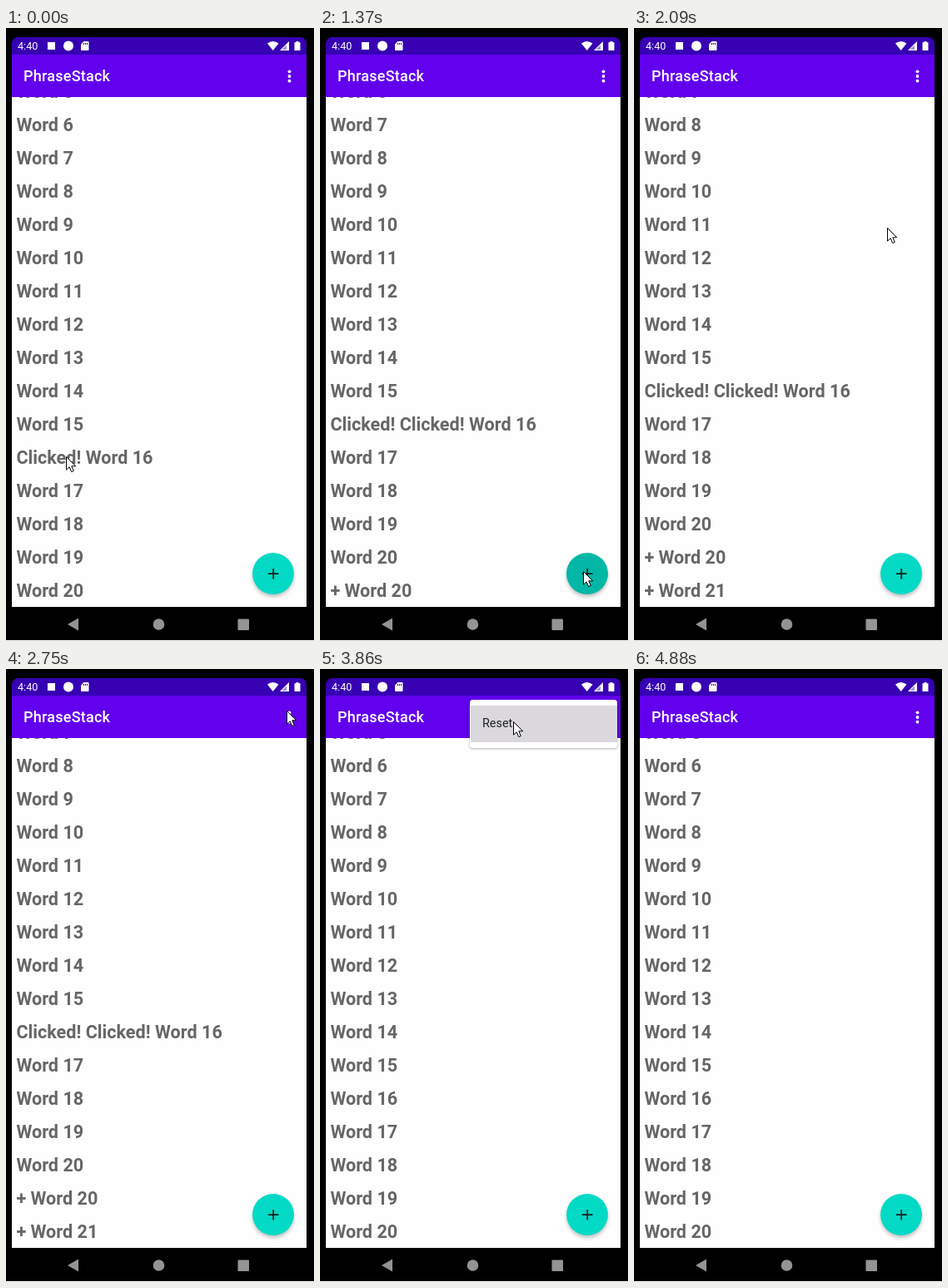
Animation, 370 px wide and 737 px high, one loop 5.03 s. Source, as an HTML page:

```html
<!DOCTYPE html>
<html lang="en">
<head>
<meta charset="utf-8">
<title>Word list</title>
<style>
  html, body { margin: 0; width: 100%; height: 100%; overflow: hidden; background: #000; }
  body { position: relative; font-family: Roboto, sans-serif; }
  body *, .icons { position: absolute; }
  .icons { left: 0; top: 0; }
  .edge { left: 0; top: 736px; width: 370px; height: 1px; background: #fff; }

  .status { left: 7px; top: 11px; width: 354px; height: 22px; background: #3700b3; border-radius: 8px 8px 0 0; }
  .clock { left: 7px; top: 0; font-size: 12.6px; line-height: 22px; color: #fff; }
  .bar { left: 7px; top: 32px; width: 354px; height: 50.5px; background: #6200ee; }
  .title { left: 14px; top: 1px; font: 500 18px/50px Roboto, sans-serif; letter-spacing: .0125em; color: #fff; }

  .list { left: 7px; top: 82px; width: 354px; height: 613.5px; overflow: hidden; background: #fefefe; }
  .rows { left: 5.4px; top: -25.5px; }
  .rows div { position: static; height: 40px; font: bold 21.6px/40px Roboto, sans-serif; color: #666; white-space: pre; }
  .rows span { position: static; }

  .fab { left: 295.8px; top: 630.8px; width: 50.4px; height: 50.4px; border-radius: 50%; overflow: hidden;
         background: #03dac5; box-shadow: 0 3px 4px rgba(0, 0, 0, .24); }
  .wave { left: 3.7px; top: 7.7px; width: 33px; height: 33px; border-radius: 50%; background: rgba(0, 0, 0, .23); }
  .fab svg { left: 0; top: 0; }

  .press { left: 320px; top: 38px; width: 40px; height: 40px; border-radius: 50%; background: rgba(255, 255, 255, .2); }
  .menu { left: 180px; top: 36.5px; width: 177px; height: 58px; border-radius: 3.5px; background: #fff;
          box-shadow: 0 1px 3px rgba(0, 0, 0, .3); transform-origin: 100% 0; }
  .hover { left: 1px; top: 6.5px; width: 176px; height: 44px; background: #dad8dd; }
  .menu b { left: 15px; top: 6.5px; font: 400 14.4px/44px Roboto, sans-serif; color: #212121; }
  .cursor { left: 0; top: 0; overflow: visible; }

  .rows, .again, .once, .wave, .press, .menu, .hover, .cursor {
    animation: 5030ms step-end infinite;
  }
  .rows { animation-name: scroll; }
  .once { animation-name: once; }
  .again { animation-name: again; }
  .wave { animation-name: wave; }
  .press { animation-name: press; }
  .menu { animation-name: menu; }
  .hover { animation-name: hover; }
  .cursor { animation-name: cursor; }

  @keyframes scroll {
    0%, 76.73% { transform: none; }
    24.25% { transform: translateY(-40px); }
    33.2% { transform: translateY(-79px); }
    36.18% { transform: translateY(-80px); }
  }
  @keyframes once {
    0% { font-size: 21.6px; }
    76.73%, 100% { font-size: 0; }
  }
  @keyframes again {
    0%, 76.73%, 100% { font-size: 0; }
    7.95% { font-size: 21.6px; }
  }
  @keyframes wave {
    0%, 30.21%, 41.55%, 100% { transform: scale(0); opacity: 1; }
    24.25% { transform: scale(1.25); opacity: 1; }
    27.23% { transform: scale(2.2); opacity: .7; }
    33.2% { transform: scale(1); opacity: 1; }
    36.18% { transform: scale(2.2); opacity: .8; }
    38.56% { transform: scale(2.2); opacity: .4; }
  }
  @keyframes press {
    0%, 63.02%, 100% { opacity: 0; }
    57.65% { opacity: 1; }
  }
  @keyframes menu {
    0%, 82.1%, 100% { opacity: 0; transform: none; }
    60.03% { opacity: .8; transform: scale(.8, .88); }
    63.02% { opacity: 1; transform: none; }
    79.12% { opacity: .4; transform: none; }
  }
  @keyframes hover {
    0%, 82.1%, 100% { opacity: 0; }
    76.73% { opacity: 1; }
  }
  @keyframes cursor {
    0% { transform: translate(72px, 515px); opacity: 1; }
    10.33% { transform: translate(180px, 574px); }
    12.72% { transform: translate(289px, 633px); }
    15.7% { transform: translate(306px, 646px); }
    18.09% { transform: translate(311px, 650px); }
    24.25% { transform: translate(316px, 653px); }
    41.55% { transform: translate(304px, 240px); }
    43.93% { transform: translate(316px, 120px); }
    46.32% { transform: translate(325px, 48px); }
    49.3% { transform: translate(327px, 50px); }
    51.68% { transform: translate(329px, 52px); }
    54.67% { transform: translate(337px, 50px); }
    63.02% { transform: translate(304px, 71px); }
    65.4% { transform: translate(269px, 60px); }
    68.38% { transform: translate(251px, 58px); }
    71.37% { transform: translate(232px, 63px); }
    85.08% { transform: translate(237px, 359px); }
    88.07% { transform: translate(236px, 703px); }
    91.05% { transform: translate(53px, 604px); }
    94.03% { transform: translate(69px, 609px); }
    97.01%, 100% { transform: translate(69px, 609px); opacity: 0; }
  }
</style>
</head>
<body>
  <div class="edge"></div>
  <div class="list"><div class="rows"></div></div>
  <div class="status"><div class="clock">4:40</div></div>
  <div class="bar"><div class="title">PhraseStack</div></div>

  <svg class="icons" width="370" height="737" fill="#fff">
    <rect x="50" y="17" width="9" height="9"/>
    <circle cx="75" cy="21.5" r="6"/>
    <path d="M93.500 16H98.500Q99.500 16 99.500 17V26Q99.500 27 98.500 27H91Q90 27 90 26V19.500Z"/>
    <path d="M93.500 18v2M95.500 18v2M97.500 18v2" stroke="#3700b3"/>
    <path d="M314 18.500Q320.500 13.500 327.500 18.500L320.700 27Z"/>
    <path d="M340 16V27H329Z"/>
    <path d="M337 20.500V26H331.500Z" fill="#3700b3" opacity=".45"/>
    <path d="M348.500 16H351.500V17.200H353.500V27H346.500V17.200H348.500Z"/>
    <circle cx="340.500" cy="52.300" r="1.900"/>
    <circle cx="340.500" cy="58" r="1.900"/>
    <circle cx="340.500" cy="63.700" r="1.900"/>
    <g fill="#949494">
      <path d="M74 717L87 709.500V724.500Z"/>
      <circle cx="183.500" cy="717" r="6.800"/>
      <rect x="278.500" y="710.500" width="13.500" height="13.500" rx="1"/>
    </g>
  </svg>

  <div class="fab">
    <div class="wave"></div>
    <svg width="51" height="51"><path d="M18.900 25.200h12.600M25.200 18.900v12.600" stroke="#10201e" stroke-width="1.800"/></svg>
  </div>
  <div class="press"></div>
  <div class="menu"><div class="hover"></div><b>Reset</b></div>
  <svg class="cursor" width="13" height="20">
    <path d="M.5 .5V16.200L4.200 12.800L6.700 18.600L9.300 17.500L6.800 11.800H11.700Z" fill="#fff" stroke="#000"/>
  </svg>

<script>
  const rows = document.querySelector('.rows');
  const addRow = html => rows.insertAdjacentHTML('beforeend', `<div>${html}</div>`);
  const clicks = '<span class="once">Clicked! </span><span class="again">Clicked! </span>';
  for (let n = 5; n <= 20; n++) addRow((n === 16 ? clicks : '') + 'Word ' + n);
  for (const n of [20, 21]) addRow('+ Word ' + n);
</script>
</body>
</html>
```
